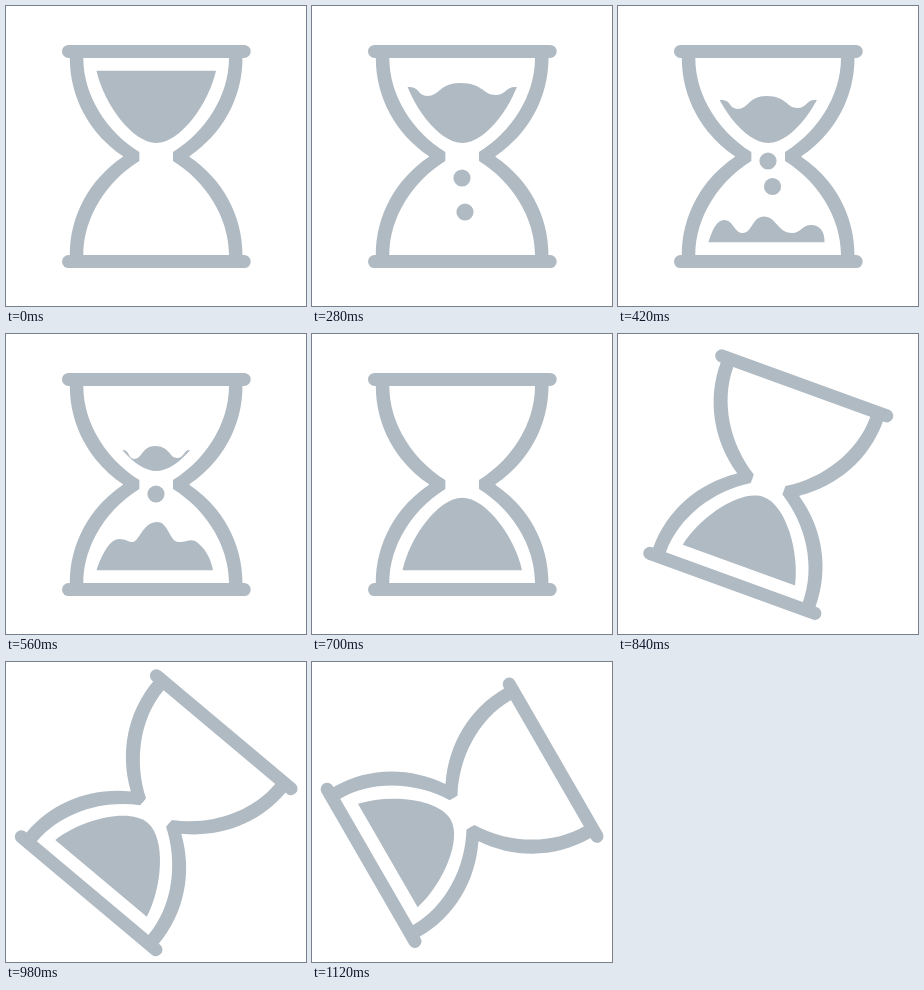
An HTML page that plays this animation: 300x300 px, repeating every 1.26 s.

```html
<!DOCTYPE html>
<html lang="en">
<head>
<meta charset="utf-8">
<title>Hourglass</title>
<style>
html, body { margin: 0; height: 100%; overflow: hidden; background: #fff; }
svg { display: block; width: 100vw; height: 100vh; }
</style>
</head>
<body>
<svg viewBox="0 0 300 300" fill="#b0bac3">
  <defs>
    <path id="bulb" d="M90.5 64.8H210C203 97 174.5 137 150.25 137S97.5 97 90.5 64.8Z"/>
    <path id="wall" d="M63.8 50V52C63.8 92 84 128 117 150.3V151H133.3V146C101 126 77.3 90 77.3 52V50Z"/>
    <g id="half">
      <path d="M62.5 45.4H238.2" stroke="#b0bac3" stroke-width="13" stroke-linecap="round"/>
      <use href="#wall"/>
      <use href="#wall" transform="matrix(-1 0 0 1 300.3 0)"/>
    </g>
    <clipPath id="inside"><use href="#bulb"/></clipPath>
  </defs>
  <g id="glass">
    <use href="#half"/>
    <use href="#half" transform="matrix(1 0 0 -1 0 301)"/>
    <g clip-path="url(#inside)">
      <path id="top" d="M-90 4H-46C-38 4 -39 13 -31 13C-20 13 -20 0 -2 0C18 0 18 12 29 12C38 12 38 4 46 4H90V150H-90Z"/>
    </g>
    <path id="pile"/>
    <g id="drops"></g>
  </g>
</svg>
<script>
const el = id => document.getElementById(id);
const STEP = 140, STEPS = 9;

const low = 'M90.5 236.3C94 224 99 214 106 214C115 214 116 226 124 227C134 228 134 210.5 146 210.5C158 210.5 160 227 174 227C183 227 184 219 193 219C202 219 207 226 206.5 236.3Z';
const high = 'M90.5 236.3C96 220 104 205 113 205C123 205 125 212 131 205C137 197 141 188 151 188C163 188 163 208 173 208C183 208 186 203 193 210C201 217 205 226 207 236.3Z';
const full = 'M90.5 236.2H210C203 204 174.5 163.8 150.25 163.8S97.5 204 90.5 236.2Z';

// Sand surface height, wave width, pile outline, falling grains
const poses = [
  [20, 1, '', []],
  [64, 1.25, '', [[150, 150.5]]],
  [77, 1.14, '', [[150, 172], [153, 206]]],
  [90, 1, low, [[150, 155], [154.5, 180.5]]],
  [112, 0.72, high, [[150, 160]]],
  [150, 1, full, []]
];

let shown = -1;
function draw(now) {
  const step = Math.floor(now / STEP) % STEPS;
  if (step === shown) return;
  shown = step;
  const [level, width, pile, drops] = poses[Math.min(step, poses.length - 1)];
  const angle = 20 * Math.max(0, step - 5);
  el('glass').setAttribute('transform', `rotate(${angle} 150 150.4)`);
  el('top').setAttribute('transform', `translate(150.5 ${level}) scale(${width} 1)`);
  el('pile').setAttribute('d', pile);
  el('drops').innerHTML = drops.map(([x, y]) => `<circle cx="${x}" cy="${y}" r="8.6"/>`).join('');
}

const start = performance.now();
function tick() {
  draw(performance.now() - start);
  requestAnimationFrame(tick);
}
tick();
</script>
</body>
</html>
```
